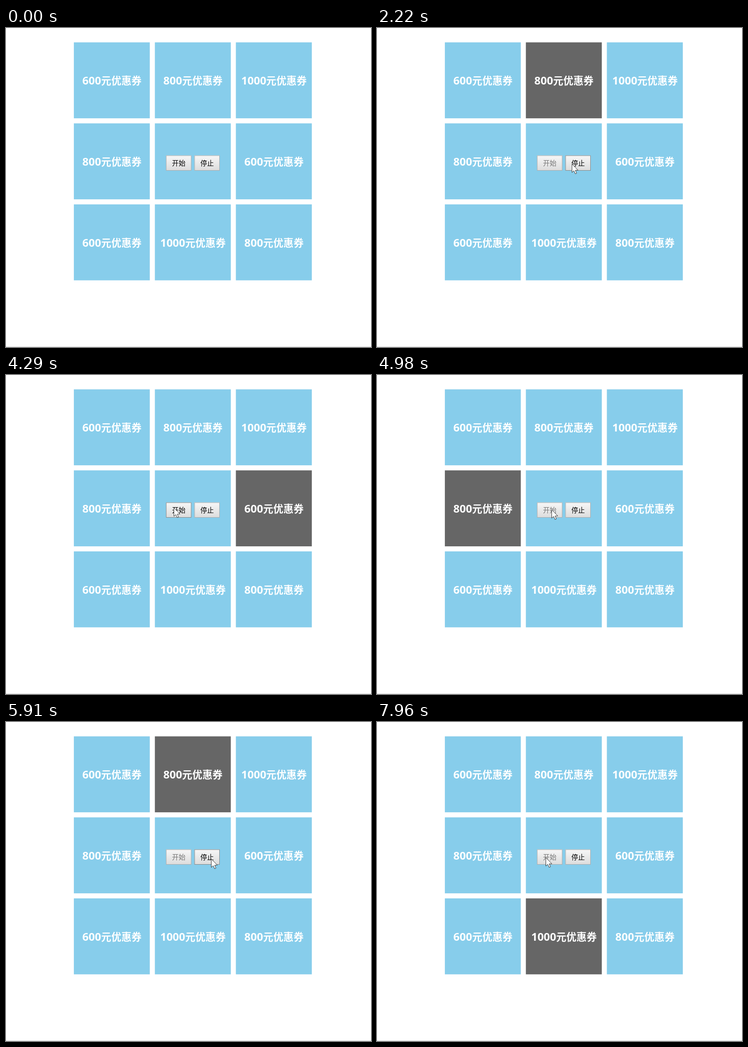
Recreate the animation shown at these times as an HTML page with a canvas. Size 801 by 700 pixels, loop 8000 ms.

```html
<!DOCTYPE html>
<html lang="zh">
<head>
<meta charset="utf-8">
<title>抽奖九宫格</title>
<style>
  html, body { margin: 0; width: 100%; height: 100%; overflow: hidden; background: #fff; }
  canvas { display: block; }
</style>
</head>
<body>
<canvas id="stage" width="801" height="700"></canvas>
<script>
const ctx = document.getElementById('stage').getContext('2d');
const LOOP = 8000, TICK = 50, REFRESH = 78, PRESS = 70, DELAY = 150;
const CJK = '"Noto Sans CJK SC", "Noto Sans CJK", sans-serif';
const SKY = '#87cdeb';

// The page is zoomed: 150px cells with 10px gaps
const ZOOM = 10 / 9, CELL = 150 * ZOOM, PITCH = 160 * ZOOM;
const LEFT = 148.9, TOP = 31.5;
const BUTTON_W = 55.6, BUTTON_H = 33.4, BUTTON_Y = 279.6;

const START = { x: 351.2, label: '开始' };
const STOP = { x: START.x + 56 * ZOOM, label: '停止' };

const RUNS = [
  { press: 1290, stop: 3130 },
  { press: 4670, stop: 6480 },
  { press: 7890, stop: Infinity }
];

const ENTRY = { x: 722, y: 740 };
const MOVES = [
  { at: 70, lasts: 360, x: 386, y: 271 },
  { at: 580, lasts: 240, x: 385, y: 298 },
  { at: 1990, lasts: 390, x: 447, y: 298 },
  { at: 3890, lasts: 400, x: 368, y: 291 },
  { at: 4980, lasts: 390, x: 455, y: 315 },
  { at: 5530, lasts: 230, x: 450, y: 300 },
  { at: 7260, lasts: 220, x: 370, y: 297 }
];
const ARROW = new Path2D('M0 0V18.5L4.2 14.8L7.3 21.5L10.3 20.2L7.3 13.8L13.3 13.6Z');

// Time elapsed since an event, in whole screen refreshes
const elapsed = ms => Math.floor((ms + 12) / REFRESH) * REFRESH;

function pointerAt(t) {
  let { x, y } = ENTRY;
  for (const move of MOVES) {
    if (t < move.at) break;
    const p = Math.min(1, (elapsed(t - move.at) + REFRESH) / (move.lasts + REFRESH - 12));
    x += (move.x - x) * p;
    y += (move.y - y) * p;
  }
  return { x, y };
}

function stateAt(t) {
  let count = 1, lit = -1, startDown = false, running = false;
  for (const { press, stop } of RUNS) {
    if (t < press) break;
    const active = t < stop;
    const since = (active ? elapsed(t - press) : stop - press) - DELAY;
    if (since >= 0) lit = count += 1 + Math.floor(since / TICK);
    startDown = active && t < press + PRESS;
    running = active && !startDown;
  }
  return { lit: lit < 0 ? lit : lit % 8, startDown, running };
}

function fillCell(col, row, color) {
  ctx.fillStyle = color;
  ctx.fillRect(LEFT + col * PITCH, TOP + row * PITCH, CELL, CELL);
}

// Cells are numbered clockwise from the top left
function drawPrize(i, lit) {
  const angle = (i - 3) * Math.PI / 4;
  const col = 1 + Math.round(Math.cos(angle));
  const row = 1 + Math.round(Math.sin(angle));
  fillCell(col, row, lit ? '#666' : SKY);

  const runs = [
    [600 + 200 * (i % 3), 'bold 24px "Noto Sans", sans-serif'],
    ['元优惠券', `bold ${20 * ZOOM}px ${CJK}`]
  ];
  const widths = runs.map(([text, font]) => {
    ctx.font = font;
    return ctx.measureText(text).width;
  });
  let x = LEFT + col * PITCH + (CELL - widths[0] - widths[1]) / 2 + 0.3;
  ctx.textAlign = 'left';
  ctx.fillStyle = '#fff';
  runs.forEach(([text, font], k) => {
    ctx.font = font;
    ctx.fillText(text, x, TOP + row * PITCH + 92.6);
    x += widths[k];
  });
}

function drawButton({ x, label }, pointer, disabled, down) {
  const hover = pointer.x >= x && pointer.x < x + BUTTON_W
    && pointer.y >= BUTTON_Y && pointer.y < BUTTON_Y + BUTTON_H;
  const face = ctx.createLinearGradient(0, BUTTON_Y, 0, BUTTON_Y + BUTTON_H);
  face.addColorStop(0, down ? '#e6e6e6' : '#f7f7f7');
  face.addColorStop(1, down ? '#d6d6d6' : '#dcdcdc');
  ctx.fillStyle = face;
  ctx.fillRect(x, BUTTON_Y, BUTTON_W, BUTTON_H);
  ctx.lineWidth = 1;
  ctx.strokeStyle = hover && !disabled ? '#858585' : '#aaa';
  ctx.strokeRect(x + 0.5, BUTTON_Y + 0.5, BUTTON_W - 1, BUTTON_H - 1);
  ctx.font = `${13.33 * ZOOM}px ${CJK}`;
  ctx.textAlign = 'center';
  ctx.fillStyle = disabled ? '#777' : '#000';
  ctx.fillText(label, x + BUTTON_W / 2, BUTTON_Y + 22.4);
}

function drawPointer({ x, y }) {
  ctx.save();
  ctx.translate(x + 0.5, y + 0.5);
  ctx.fillStyle = '#fff';
  ctx.fill(ARROW);
  ctx.lineWidth = 1;
  ctx.strokeStyle = '#333';
  ctx.stroke(ARROW);
  ctx.restore();
}

function draw(t) {
  const state = stateAt(t), pointer = pointerAt(t);
  ctx.fillStyle = '#fff';
  ctx.fillRect(0, 0, 801, 700);
  ctx.fillStyle = '#d9d9d9';
  ctx.fillRect(0, 699, 801, 1);
  for (let i = 0; i < 8; i++) drawPrize(i, i === state.lit);
  fillCell(1, 1, SKY);
  drawButton(START, pointer, state.running, state.startDown);
  drawButton(STOP, pointer, false, false);
  drawPointer(pointer);
}

let origin;
function frame(now) {
  origin ??= now;
  draw((now - origin) % LOOP);
  requestAnimationFrame(frame);
}
draw(0);
requestAnimationFrame(frame);
</script>
</body>
</html>
```
